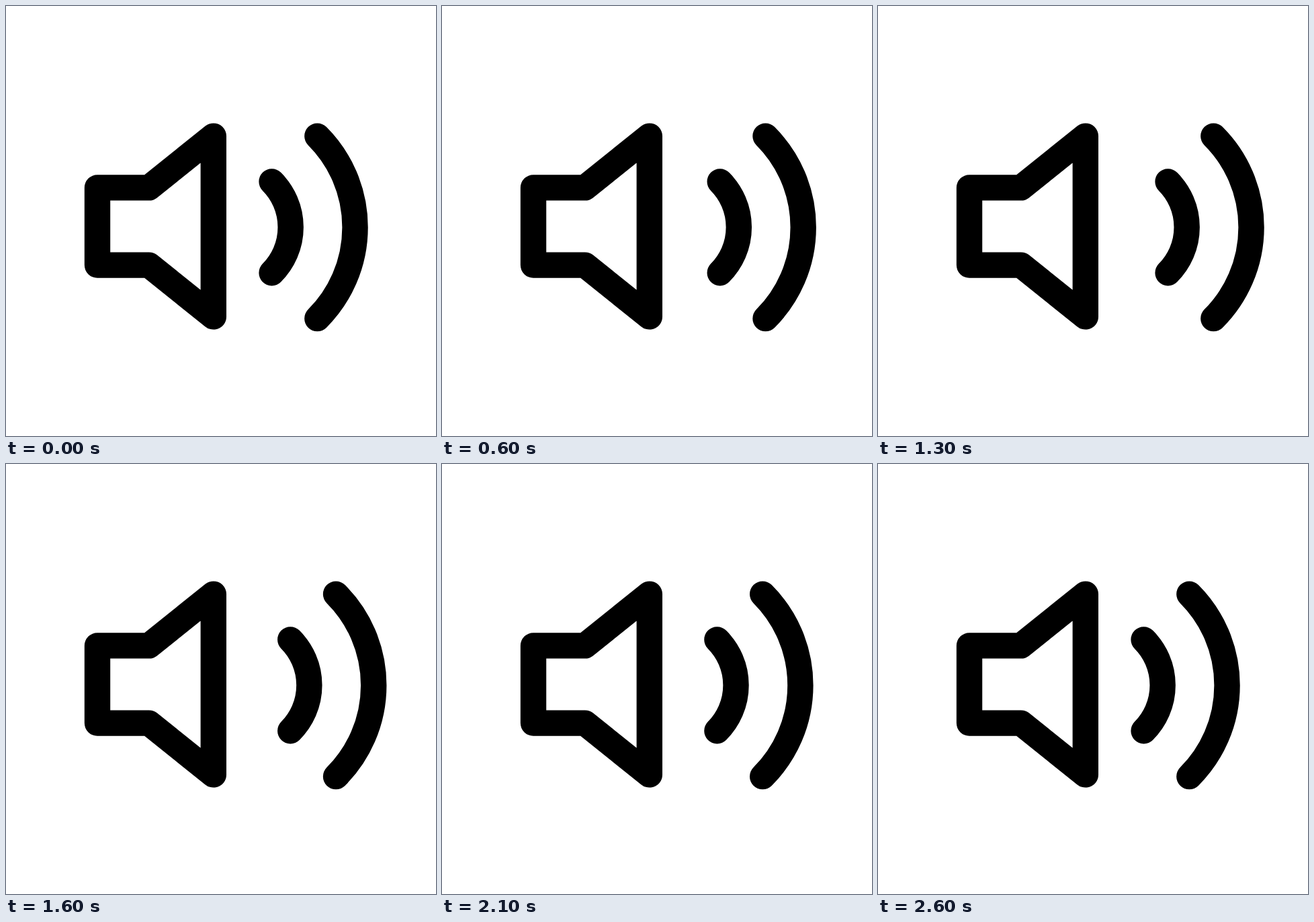
An HTML page that plays this animation: 640 by 640 pixels, repeating every 2700 ms.

```html
<!DOCTYPE html>
<html lang="en">
<head>
<meta charset="utf-8">
<title>Speaker</title>
<style>
  html, body { margin: 0; width: 100%; height: 100%; overflow: hidden; background: #fff; }
  svg { display: block; width: 100%; height: 100%; }
</style>
</head>
<body>
<svg viewBox="0 0 640 640">
  <g fill="none" stroke="#000" stroke-width="2" stroke-linecap="round" stroke-linejoin="round">
    <path transform="translate(97.6 97.6) scale(19.2)" d="M11 5 6 9H2v6h4l5 4z"/>
    <path id="waves" d="M19.07 4.93a10 10 0 0 1 0 14.14M15.54 8.46a5 5 0 0 1 0 7.07"/>
  </g>
</svg>
<script>
  const LOOP = 2700, STEP = 100, HALF = 1300, TRAVEL = 36;
  const waves = document.getElementById('waves');

  // Eased slide out, linear slide back.
  const easeOut = x => x * (0.9 + x * (0.69 - 0.59 * x));
  const slide = t => TRAVEL * (t < HALF ? easeOut(t / HALF) : 2 - t / HALF);

  function draw(now) {
    const t = Math.floor((now % LOOP) / STEP) * STEP;
    waves.setAttribute('transform', `translate(${97.2 + slide(t)} 99) scale(19.2)`);
    requestAnimationFrame(draw);
  }
  draw(0);
</script>
</body>
</html>
```
